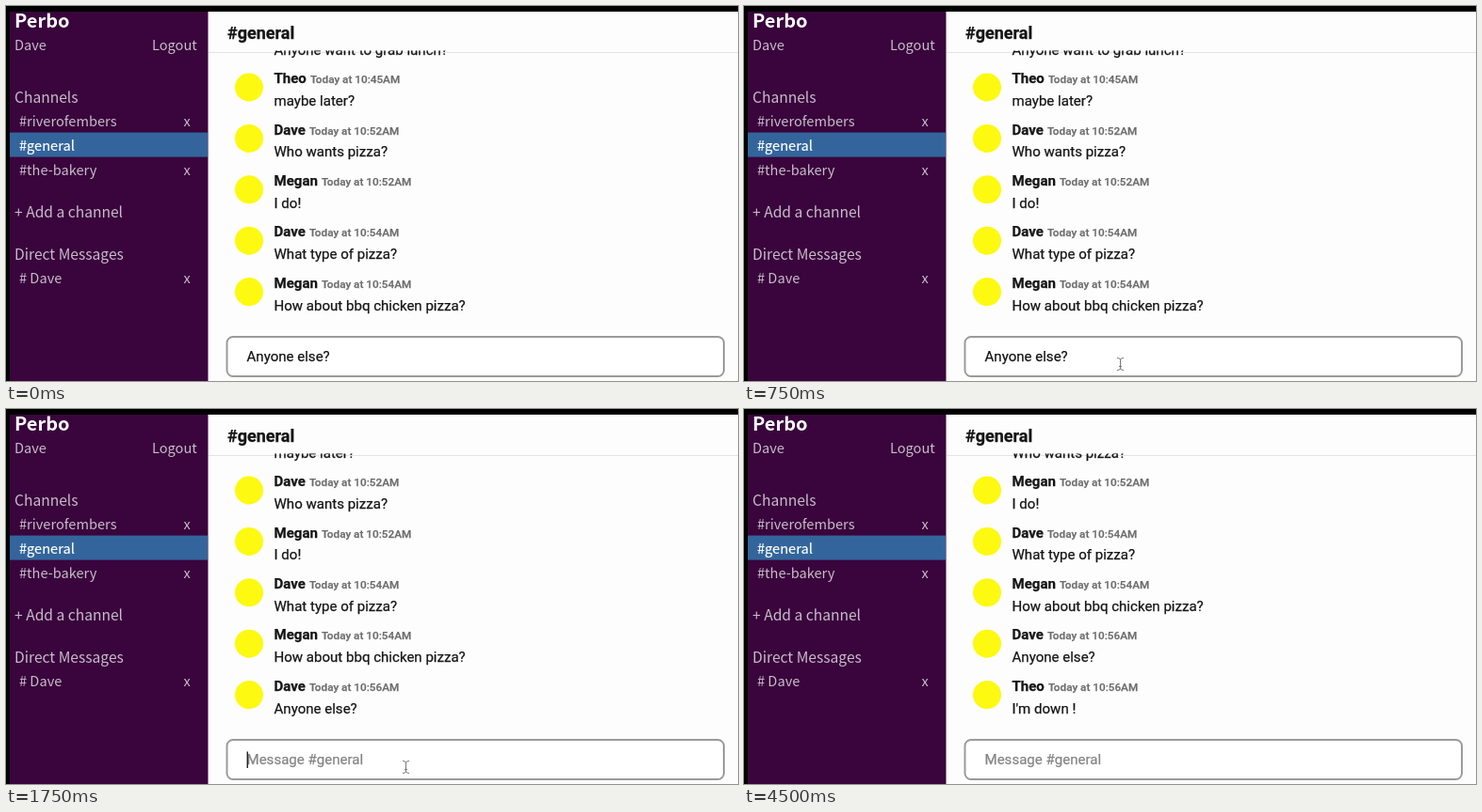
Write an HTML page that moves like this. It is 777 by 399 pixels and loops after 6.5 s.

```html
<!DOCTYPE html>
<html lang="en">
<head>
<meta charset="utf-8">
<title>Team chat</title>
<style>
  html, body { margin: 0; width: 100%; height: 100%; overflow: hidden; background: #000; }
  svg { display: block; width: 777px; height: 399px; }
  text { white-space: pre; }
  .side { font: 14.6px "Noto Sans CJK JP", "Noto Sans CJK SC", "Noto Sans CJK", "Noto Sans", sans-serif; fill: #c8bccb; }
  .side .head { font-size: 15.6px; }
  .side .brand { font-size: 20px; font-weight: 700; fill: #fff; }
  .side .on { fill: #fff; stroke: #fff; stroke-width: .2px; }
  .chat { font: 15.05px Roboto, sans-serif; fill: #151515; }
  .chat text { stroke: currentColor; stroke-width: .25px; color: #151515; }
  .title { font-size: 18px; font-weight: 700; }
  .name { font-weight: 700; }
  .chat .time { font-size: 11.75px; font-weight: 500; fill: #6c6c6c; stroke: #6c6c6c; }
  .chat .hint { fill: #858585; stroke: #858585; }
</style>
</head>
<body>
<svg viewBox="0 0 777 399">
  <clipPath id="view"><rect x="215" y="47.5" width="562" height="300"/></clipPath>
  <rect x="4" y="6" width="211" height="393" fill="#39053c"/>
  <rect x="214.5" y="6" width="562.5" height="393" fill="#fdfdfd"/>
  <rect x="4" y="134.6" width="210" height="26" fill="#33659c"/>
  <g class="side" id="side"></g>
  <g class="chat">
    <path d="M215 49.5H777" stroke="#e4e4e8"/>
    <text class="title" x="235" y="35">#general</text>
    <g clip-path="url(#view)"><g id="log"></g></g>
    <rect x="234.5" y="352" width="527.5" height="42" rx="6.5" fill="#fff" stroke="#9b9b9b" stroke-width="2"/>
    <text id="field" x="255.5" y="378"></text>
  </g>
  <path id="caret" d="M0 364.5V382" stroke="#222" stroke-width="1.4"/>
  <path id="pointer" d="M-3.5 -6.5Q0 -6.5 0 -4.5Q0 -6.5 3.5 -6.5M0 -5V5M-3.5 6.5Q0 6.5 0 4.5Q0 6.5 3.5 6.5M-1.5 2.5H1.5"
        fill="none" stroke="#777"/>
</svg>
<script>
const LOOP = 6500, ROW = 54.4;
const $ = id => document.getElementById(id);

const sideText = [
  [9, 23, "Perbo", "brand"], [9, 47, "Dave"], [155, 47, "Logout"],
  [9, 102.5, "Channels", "head"],
  [14, 128, "#riverofembers"], [188.5, 128, "x"],
  [14, 154, "#general", "on"],
  [14, 180, "#the-bakery"], [188.5, 180, "x"],
  [9, 225, "+ Add a channel", "head"],
  [9, 269.5, "Direct Messages", "head"],
  [14, 295, "# Dave"], [188.5, 295, "x"]
];
$("side").innerHTML = sideText.map(([x, y, text, cls = ""]) =>
  `<text x="${x}" y="${y}" class="${cls}">${text}</text>`).join("");

const messages = [
  ["Megan", "10:45", "Anyone want to grab lunch?"],
  ["Theo", "10:45", "maybe later?"],
  ["Dave", "10:52", "Who wants pizza?"],
  ["Megan", "10:52", "I do!"],
  ["Dave", "10:54", "What type of pizza?"],
  ["Megan", "10:54", "How about bbq chicken pizza?"],
  ["Dave", "10:56", "Anyone else?"],
  ["Theo", "10:56", "I'm down !"]
];
$("log").innerHTML = messages.map(([name, time, text], i) => `
  <g transform="translate(0 ${(i - 1) * ROW})">
    <circle cx="258" cy="86.5" r="15" fill="#fdf910"/>
    <text x="284.5" y="82.3"><tspan class="name">${name}</tspan><tspan class="time" dx="4">Today at ${time}AM</tspan></text>
    <text x="284.5" y="106">${text}</text>
  </g>`).join("");
const rows = [...$("log").children];

// Pointer position from each moment on; null hides it.
const pointerPath = [
  [0, null], [250, [472, 393]], [500, [404.5, 391]],
  [750, [399.5, 381]], [1750, [424.5, 381]], [2000, null]
];

function draw(t) {
  const sent = t >= 1500;
  const shift = (t >= 1750) + (t >= 4500);
  $("log").setAttribute("transform", `translate(0 ${-shift * ROW})`);
  rows.forEach((row, i) => row.style.display = i < 6 + shift ? "" : "none");

  $("field").textContent = sent ? "Message #general" : "Anyone else?";
  $("field").setAttribute("class", sent ? "hint" : "");

  const caretOn = t >= 1000 && t < 2000 || t >= 2500 && t < 3000;
  $("caret").style.display = caretOn ? "" : "none";
  $("caret").setAttribute("transform", `translate(${sent ? 256.3 : 344.5} 0)`);

  const spot = pointerPath.findLast(([start]) => t >= start)[1];
  $("pointer").style.display = spot ? "" : "none";
  if (spot) $("pointer").setAttribute("transform", `translate(${spot})`);
}

const begin = performance.now();
function tick() {
  draw((performance.now() - begin) % LOOP);
  requestAnimationFrame(tick);
}
tick();
</script>
</body>
</html>
```
